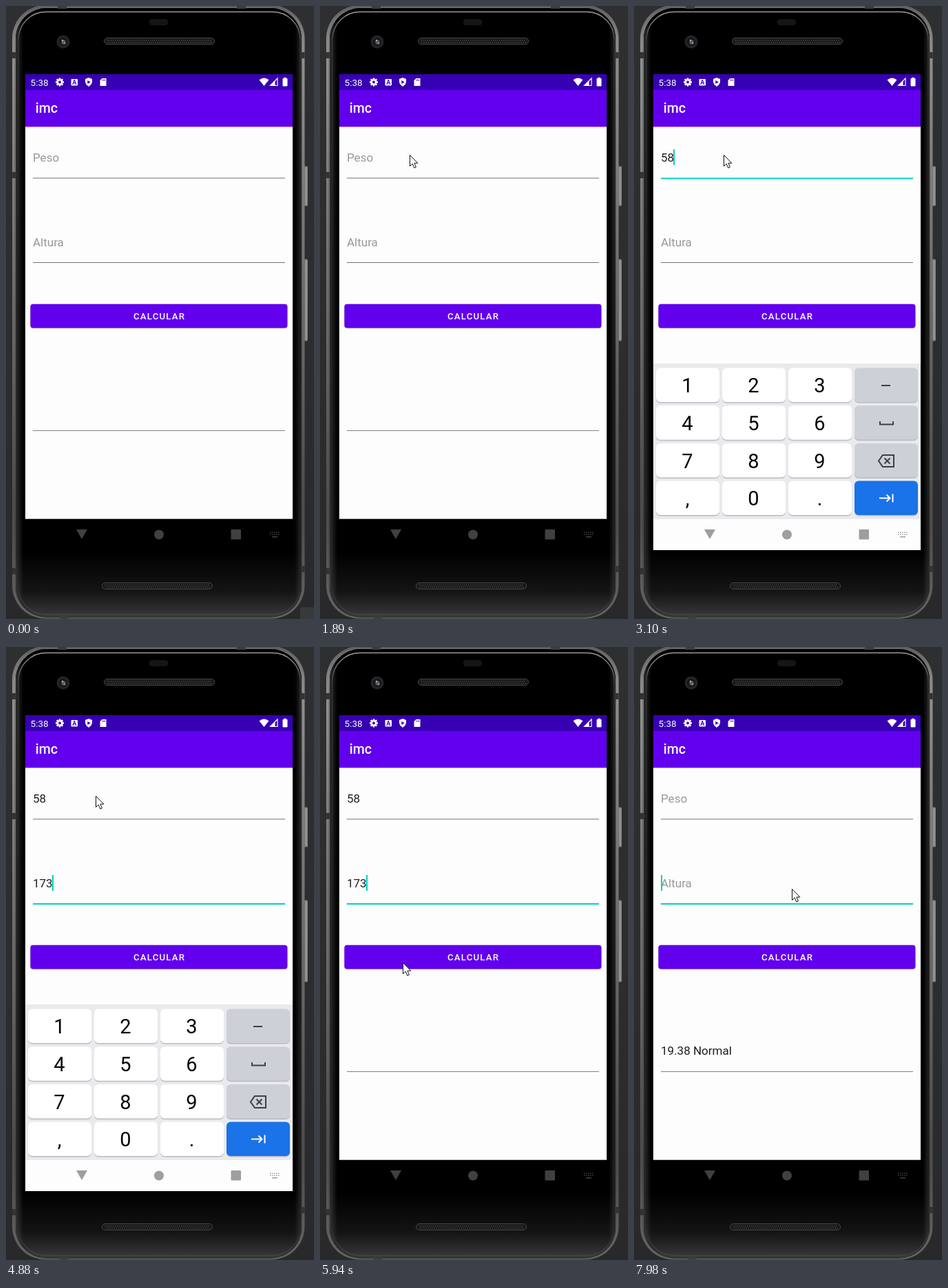
Recreate the animation shown at these times as an HTML page with a canvas. Size 447 by 890 pixels, loop 8000 ms.

```html
<!DOCTYPE html>
<html lang="pt">
<head>
<meta charset="utf-8">
<title>imc</title>
<style>
html, body { margin: 0; width: 100%; height: 100%; overflow: hidden; background: #2b2c2e; }
canvas { display: block; width: 447px; height: 890px; }
</style>
</head>
<body>
<canvas id="stage" width="447" height="890"></canvas>
<script>
const W = 447, H = 890, LOOP = 8000, STEP = 70;
const PURPLE = '#6200ee', TEAL = '#03d0be', INK = '#1f1f1f', HINT = '#999';
const BUTTON = [35.4, 432.7, 373, 34.9, 4];
const ctx = document.getElementById('stage').getContext('2d');

const clamp = v => Math.max(0, Math.min(1, v));
const mix = (a, b, k) => a + (b - a) * k;
const span = (t, a, b) => clamp((t - a) / (b - a));

function layer(draw) {
  const c = document.createElement('canvas');
  c.width = W;
  c.height = H;
  draw(c.getContext('2d'));
  return c;
}
function rect(g, x, y, w, h, color) {
  g.fillStyle = color;
  g.fillRect(x, y, w, h);
}
function round(g, x, y, w, h, r, fill, stroke, width = 1) {
  g.beginPath();
  g.roundRect(x, y, w, h, r);
  if (fill) { g.fillStyle = fill; g.fill(); }
  if (stroke) { g.strokeStyle = stroke; g.lineWidth = width; g.stroke(); }
}
function disc(g, x, y, r, color) {
  g.fillStyle = color;
  g.beginPath();
  g.arc(x, y, r, 0, 7);
  g.fill();
}
function path(g, pts, fill, stroke, width = 1, open = false) {
  g.beginPath();
  pts.forEach(([x, y]) => g.lineTo(x, y));
  if (!open) g.closePath();
  if (fill) { g.fillStyle = fill; g.fill(); }
  if (stroke) { g.strokeStyle = stroke; g.lineWidth = width; g.stroke(); }
}
function text(g, s, x, y, size, color, weight = 400, align = 'left', gap = 0) {
  g.font = `${weight} ${size}px Roboto, sans-serif`;
  g.letterSpacing = gap + 'px';
  g.textAlign = align;
  g.fillStyle = color;
  g.fillText(s, x, y);
}
function shade(g, stops, x = 0, y = H) {
  const grad = g.createLinearGradient(0, 0, x, y);
  stops.forEach(([at, color]) => grad.addColorStop(at, color));
  return grad;
}

function speaker(g, x, y) {
  round(g, x + .5, y + .5, 160, 9, 4.5, '#161616', '#4a4a4a');
  for (let i = 0; i < 51; i++)
    for (let j = 0; j < 2; j++) rect(g, x + 4 + i * 3 + j * 1.5, y + 3 + j * 3, 1.4, 1.4, '#505050');
}

function drawBody(g) {
  rect(g, 0, 0, W, H, shade(g, [[0, '#2e2f31'], [.5, '#2c2d2f'], [1, '#29292b']]));
  for (const [y, h] of [[232, 59], [367, 120]]) {
    round(g, 430, y, 8.5, h, 2, '#777', '#2a2a2a');
    rect(g, 434, y + 2, 3, h - 4, '#929292');
  }
  const metal = shade(g, [[0, '#666'], [.05, '#858585'], [.3, '#707070'], [.6, '#5c5c5c'], [.85, '#484848'], [1, '#606060']]);
  const gloss = shade(g, [[0, '#555'], [.08, '#a0a0a0'], [.4, '#808080'], [.8, '#505050'], [1, '#6a6a6a']]);
  round(g, 9, -1, 424.5, 890.5, 48, metal);
  round(g, 10.5, .5, 421.5, 887.5, 47, null, gloss);
  round(g, 14, 3, 415, 884.5, 45, '#000');

  // Soft light on the glass along the sides and the lower edge.
  g.save();
  g.clip();
  rect(g, 14, 0, 415, H, shade(g, [[0, '#000'], [.89, '#000'], [.955, '#141414'], [1, '#3c3c3c']]));
  rect(g, 14, 0, 415, H, shade(g, [
    [.03, 'rgba(80,80,80,.6)'], [.056, 'rgba(80,80,80,0)'],
    [.938, 'rgba(80,80,80,0)'], [.965, 'rgba(80,80,80,.6)']
  ], W, 0));
  g.restore();
  for (const y of [67, 241, 816]) rect(g, 9, y, 6, 9, '#333');
  for (const y of [67, 813]) rect(g, 428, y, 5.5, 9, '#333');
  for (const [x, y] of [[75, 0], [335, 0], [78, 885]]) rect(g, x, y, 13, 4, '#3c3c3c');
  round(g, 18, 8.5, 409, 875, 40, null,
    shade(g, [[0, '#a0a0a0'], [.012, '#999'], [.06, '#333'], [.5, '#1a1a1a'], [.94, '#222'], [1, '#4a4a4a']]), 1.5);

  round(g, 208, 19, 27, 9, 4, '#151515');
  disc(g, 83, 52, 9.5, '#242426');
  disc(g, 83, 52, 6, '#151518');
  disc(g, 83.5, 52.5, 3.2, '#555b66');
  disc(g, 82, 50, 1.3, '#aaa');
  disc(g, 85, 54, 1.2, '#999');
  speaker(g, 142, 46);
  speaker(g, 139, 837);
}

function drawStatus(g) {
  const bar = '#3700b3', on = '#fff';
  rect(g, 28, 99, 388, 23, bar);
  text(g, '5:38', 35.6, 116, 13.5, on);
  for (let i = 0; i < 8; i++) {
    g.save();
    g.translate(78, 110.5);
    g.rotate(i * Math.PI / 4);
    rect(g, -1.3, -6, 2.6, 4, on);
    g.restore();
  }
  disc(g, 78, 110.5, 4.4, on);
  disc(g, 78, 110.5, 1.9, bar);
  round(g, 94.5, 106, 9.5, 9.5, 1, on);
  text(g, 'A', 99.2, 114, 9, bar, 700, 'center');
  path(g, [[120, 104], [125, 106], [125, 110.5], [123.5, 114], [120, 117], [116.5, 114], [115, 110.5], [115, 106]], on);
  path(g, [[118.3, 108], [122.8, 110.5], [118.3, 113]], bar);
  path(g, [[139.5, 105], [145.5, 105], [145.5, 116], [136.5, 116], [136.5, 108]], on);
  for (let i = 0; i < 3; i++) rect(g, 139.5 + i * 1.8, 106.5, .9, 2.2, bar);

  g.fillStyle = on;
  g.beginPath();
  g.moveTo(374.5, 116);
  g.lineTo(367.5, 107.3);
  g.quadraticCurveTo(374.5, 101.5, 381.5, 107.3);
  g.fill();
  path(g, [[394, 105], [394, 115.5], [383.5, 115.5]], null, on, 1.2);
  path(g, [[390.5, 108.5], [390.5, 115.5], [383.5, 115.5]], on);
  round(g, 401.5, 105, 7, 11.5, 1, on);
  rect(g, 403.3, 103.8, 3.4, 2, on);
}

function drawApp(g) {
  rect(g, 28, 99, 388, 645.7, '#fdfdfd');
  drawStatus(g);
  rect(g, 28, 122, 388, 53.4, PURPLE);
  text(g, 'imc', 42.8, 155, 19.6, '#fff', 500);
  rect(g, 39, 616, 366, 1, '#818181');
}

function drawKeys(g) {
  rect(g, 28, 519, 388, 271, '#e8eaed');
  const labels = ['123-', '456_', '789<', ',0.>'];
  labels.forEach((row, j) => [...row].forEach((label, i) => {
    const x = 32 + i * 96, y = 525.5 + j * 54.7;
    const fill = i < 3 ? '#fff' : j < 3 ? '#cdd0d6' : '#1a73e8';
    round(g, x, y + 1, 92, 50, 6, '#b9bcc1');
    round(g, x, y, 92, 49.5, 6, fill);
    if (i < 3) text(g, label, x + 45.5, y + 35.7, 29, '#050505', 400, 'center');
  }));
  const ink = '#3d4043';
  rect(g, 359, 550, 13, 2, ink);
  path(g, [[357, 603], [357, 607.5], [376, 607.5], [376, 603]], null, ink, 2, true);
  path(g, [[361, 652], [377, 652], [377, 669], [361, 669], [355, 660.5]], null, ink, 2);
  path(g, [[363.5, 656.5], [371.5, 664.5]], null, ink, 2, true);
  path(g, [[371.5, 656.5], [363.5, 664.5]], null, ink, 2, true);
  path(g, [[356, 714.5], [371, 714.5]], null, '#fff', 2, true);
  path(g, [[366.5, 709.5], [371.5, 714.5], [366.5, 719.5]], null, '#fff', 2, true);
  rect(g, 374.5, 708.5, 2, 12, '#fff');
}

function drawNav(v) {
  const n = Math.round(mix(64, 158, v ** 3)), color = `rgb(${n},${n},${n})`;
  path(ctx, [[102, 760], [118, 760], [110, 774]], color);
  disc(ctx, 222, 767.5, 7, color);
  round(ctx, 326.5, 760, 14.5, 14.5, 1, color);
  for (let i = 0; i < 5; i++)
    for (let j = 0; j < 2; j++) rect(ctx, 383 + i * 3, 763.5 + j * 3, 1.5, 1.5, color);
  rect(ctx, 386, 770, 8, 1.5, color);
}

const body = layer(g => { drawBody(g); drawApp(g); });
const keys = layer(drawKeys);

// The picture advances in steps counted from the start of each burst of motion.
const BURSTS = [30, 1350, 2210, 5450, 6210, 7490];
function stepped(t) {
  const start = BURSTS.filter(b => b <= t).pop();
  return start === undefined ? 0 : start + Math.floor((t - start) / STEP) * STEP;
}

const POINTER = [
  [870, 142, 230], [1080, 132, 212], [1350, 132, 212], [1490, 134, 203], [1770, 130, 216],
  [5450, 130, 216], [5940, 120, 458], [6150, 141, 451],
  [7420, 141, 451], [7630, 172, 570], [7800, 234, 465], [7980, 229, 351]
];
function pointerAt(t) {
  if (t < 870) {
    const left = (1 - span(t, 70, 870)) ** 1.85;
    return [mix(142, 441, left), mix(230, 880, left)];
  }
  const i = POINTER.findIndex(p => p[0] > t);
  if (i < 0) return POINTER[POINTER.length - 1].slice(1);
  const [t0, x0, y0] = POINTER[i - 1], [t1, x1, y1] = POINTER[i];
  const k = span(t, t0, t1), e = k * k * (3 - 2 * k);
  return [mix(x0, x1, e), mix(y0, y1, e)];
}
function drawPointer([x, y]) {
  ctx.save();
  ctx.translate(Math.round(x) + .5, Math.round(y) + .5);
  path(ctx, [[0, 0], [0, 16], [3.7, 12.6], [6.3, 18.6], [8.9, 17.5], [6.4, 11.6], [11.3, 11.6]], '#fff', '#111');
  ctx.restore();
}

function drawField(top, line, hint, value, focused, caret) {
  rect(ctx, 39, line, 366, focused ? 2 : 1, focused ? TEAL : '#747474');
  text(ctx, value || hint, 39, top + 18, 17, value ? INK : HINT);
  if (caret) rect(ctx, Math.floor(39 + 9.4 * value.length), top, 2, 23, TEAL);
}

function drawButton(s) {
  const pressed = s >= 6210 && s < 6830;
  ctx.save();
  ctx.shadowColor = 'rgba(0,0,0,.25)';
  ctx.shadowBlur = pressed ? 4 : 1;
  ctx.shadowOffsetY = pressed ? 1.5 : .4;
  round(ctx, ...BUTTON, PURPLE);
  ctx.restore();
  if (pressed) {
    ctx.save();
    ctx.beginPath();
    ctx.roundRect(...BUTTON);
    ctx.clip();
    ctx.globalAlpha = .16 * (1 - span(s, 6700, 6840));
    disc(ctx, 141, 451, mix(30, 280, span(s, 6210, 6490)), '#fff');
    ctx.restore();
  }
  text(ctx, 'CALCULAR', 185, 455, 13.2, '#fff', 500, 'left', 1.18);
}

function drawKeyboard(s) {
  let shift = 0, alpha = 0;
  if (s >= 2210 && s < 5480) {
    shift = 215 * (1 - span(s, 2140, 2490)) ** 1.8;
    alpha = mix(.28, 1, span(s, 2210, 2346));
  } else if (s >= 5480) {
    const k = span(s, 5450, 5800);
    shift = 205 * k * k;
    alpha = 1 - k;
  }
  if (alpha > 0) {
    ctx.save();
    ctx.beginPath();
    ctx.rect(28, 175, 388, 615);
    ctx.clip();
    ctx.globalAlpha = alpha;
    ctx.drawImage(keys, 0, shift);
    if (shift < 1) rect(ctx, 28, 745, 388, 45, '#fdfdfd');
    ctx.restore();
  }
  drawNav(alpha);
}

const blink = (t, since) => Math.floor((t - since) / 510) % 2 === 0;
function caretOn(t) {
  const since = [1980, 2970, 3100, 3570, 4420, 4610, 4890, 6575].filter(e => e <= t + 10).pop();
  return since !== undefined && blink(t + 10, since);
}

function render(t) {
  const s = stepped(t);
  const cleared = t >= 6570;
  const weight = cleared || t < 2970 ? '' : '58'.slice(0, t < 3100 ? 1 : 2);
  const height = cleared || t < 4420 ? '' : '173'.slice(0, t < 4610 ? 1 : t < 4880 ? 2 : 3);
  const first = t >= 1910 && t < 3570, second = t >= 3570;
  const caret = caretOn(t);

  ctx.drawImage(body, 0, 0);
  drawField(208, 249.4, 'Peso', weight, first, first && caret);
  drawField(331, 372, 'Altura', height, second, second && caret);
  drawButton(s);
  if (cleared) text(ctx, '19.38 Normal', 39, 592, 17, INK);
  drawKeyboard(s);
  if (t < 70) rect(ctx, 427, 873, 20, 17, '#38393b');
  else drawPointer(pointerAt(s));
}

function tick() {
  render(performance.now() % LOOP);
  requestAnimationFrame(tick);
}
tick();
</script>
</body>
</html>
```
